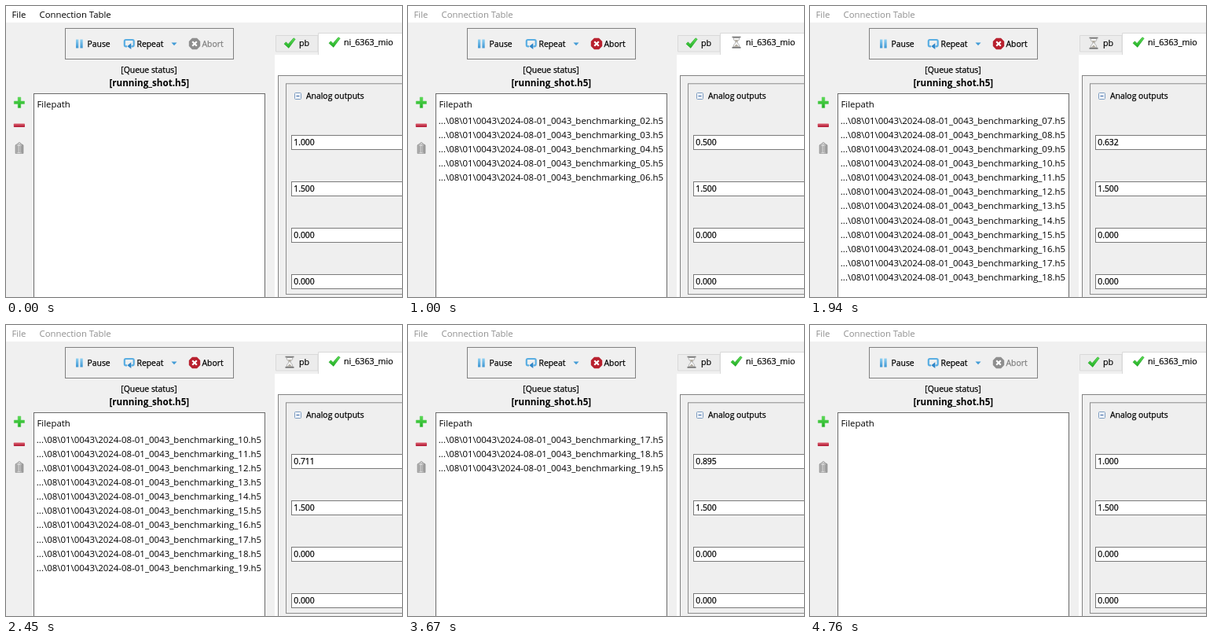
Write an HTML page that moves like this. It is 504 px wide and 370 px high and loops after 4.82 s.

```html
<!DOCTYPE html>
<html lang="en">
<head>
<meta charset="utf-8">
<title>Shot queue</title>
<style>
  html, body { margin: 0; width: 100%; height: 100%; overflow: hidden; background: #f0f0f0; }
  svg { display: block; width: 504px; height: 370px; }
  text { font-family: "Open Sans", "Noto Sans", sans-serif; fill: currentColor; color: #000; white-space: pre; }
  .ui { font-size: 11.35px; }
  .row { font-size: 11.46px; }
  .small { font-size: 10.4px; stroke: currentColor; stroke-width: .25px; }
  .tab { font-size: 10.75px; stroke: currentColor; stroke-width: .2px; }
  .head { font-size: 11.65px; font-weight: 700; }
</style>
</head>
<body>
<svg viewBox="0 0 504 370" xmlns="http://www.w3.org/2000/svg">
  <defs>
    <linearGradient id="blue" x1="0" y1="0" x2="0" y2="1">
      <stop offset="0" stop-color="#8fd0f2"/><stop offset="1" stop-color="#3d95d2"/>
    </linearGradient>
    <linearGradient id="green" x1="0" y1="0" x2="0" y2="1">
      <stop offset="0" stop-color="#5fdd58"/><stop offset="1" stop-color="#1fae22"/>
    </linearGradient>
    <linearGradient id="red" x1="0" y1="0" x2="0" y2="1">
      <stop offset="0" stop-color="#dc6272"/><stop offset="1" stop-color="#b01530"/>
    </linearGradient>
    <linearGradient id="metal" x1="0" y1="0" x2="1" y2="0">
      <stop offset="0" stop-color="#9a9a9a"/><stop offset=".45" stop-color="#dcdcdc"/><stop offset="1" stop-color="#8c8c8c"/>
    </linearGradient>
    <path id="check" d="M-7 1.2L-4.6-1.2L-1.9 1.6L5-6.2L7.2-4.8L-1.2 6.4Z" fill="url(#green)" stroke="#22a526" stroke-width=".6"/>
    <g id="glass">
      <path d="M-4-5.500C-4-2-1-1.500-1 0S-4 2.500-4 6H4C4 2.500 1 1.500 1 0S4-2 4-5.500Z" fill="#f6f6f6" stroke="#a8a8a8" stroke-width=".9"/>
      <path d="M-2.600-2.800H2.600L0 .3ZM-3 5.500L0 2.800L3 5.500Z" fill="#aaa497"/>
      <path d="M-5.500-6.500H5.500M-5.500 6.800H5.500" stroke="#787878" stroke-width="1.700"/>
    </g>
  </defs>

  <rect width="504" height="370" fill="#f0f0f0"/>
  <rect width="504" height="21" fill="#fff"/>
  <g id="menu">
    <text class="ui" x="7.500" y="15">File</text>
    <text class="ui" x="42.500" y="15">Connection Table</text>
  </g>

  <!-- toolbar -->
  <rect x="75.500" y="28.500" width="214" height="39" fill="none" stroke="#808080"/>
  <path d="M89 42.500h3.300v11H89ZM94.400 42.500h3.300v11h-3.300Z" fill="url(#blue)"/>
  <text class="small" x="103.500" y="52">Pause</text>
  <path d="M154 51.300H152.500Q150.800 51.300 150.800 49.500V44.800Q150.800 43 152.500 43H161Q162.700 43 162.700 44.800V49.500Q162.700 51.300 161 51.300H159.500" fill="none" stroke="#5aaee2" stroke-width="2.200"/>
  <path d="M159.300 47.200V55L154.300 51.200Z" fill="#2f86c8"/>
  <text class="small" x="166.500" y="52">Repeat</text>
  <path d="M210.500 46.500H217.500L214 50.300Z" fill="#419bd6"/>
  <path id="stop" d="M237 40.800H243L247.200 45V51L243 55.200H237L232.800 51V45Z"/>
  <path d="M237.200 45.200L242.800 50.800M242.800 45.200L237.200 50.800" stroke="#fff" stroke-width="2.200"/>
  <text id="abort" class="small" x="249.500" y="52">Abort</text>

  <text class="small" x="182" y="85" text-anchor="middle">[Queue status]</text>
  <text class="head" x="182.300" y="102" text-anchor="middle">[running_shot.h5]</text>

  <!-- side buttons -->
  <path d="M15.200 116h3.600v5H23.500v3.400h-4.700v5h-3.600v-5H10.300v-3.400h4.900Z" fill="url(#green)" stroke="#4cc84c" stroke-width=".5"/>
  <rect x="9.800" y="149.500" width="14.200" height="4.600" rx=".8" fill="url(#red)"/>
  <path d="M12 177Q12 175.500 17 175.500T22 177V187.500H12Z" fill="url(#metal)" stroke="#9a9a9a" stroke-width=".7"/>
  <path d="M14.500 175.500Q17 171.500 19.500 175.500M14.700 178V186M17 178V186M19.300 178V186" fill="none" stroke="#999"/>

  <rect x="35.500" y="111.500" width="294" height="270" fill="#fff" stroke="#6b6b6b"/>
  <text class="ui" x="39.500" y="129">Filepath</text>
  <g id="rows"></g>

  <!-- tabs -->
  <rect x="342" y="62" width="162" height="308" fill="#fff"/>
  <path d="M343.500 58V37.500H397V58Z" fill="#ececec" stroke="#d9d9d9"/>
  <path d="M397.500 63V34.500H504V63Z" fill="#fff"/>
  <path d="M397.500 62V34.500H504" fill="none" stroke="#d9d9d9"/>
  <use id="pb" x="361" y="47"/>
  <text class="tab" x="373" y="51">pb</text>
  <use id="mio" x="418" y="46"/>
  <text class="tab" x="430" y="50">ni_6363_mio</text>

  <!-- outputs -->
  <rect x="346.500" y="88.500" width="170" height="290" fill="#f0f0f0" stroke="#828282"/>
  <rect x="356.500" y="98.800" width="160" height="267.700" fill="#efefef" stroke="#8c8c8c"/>
  <rect x="367.500" y="110.500" width="8" height="8" rx="1" fill="#f5f8fc" stroke="#7d9cc0"/>
  <path d="M369.500 114.500H373.500" stroke="#2f5f9f"/>
  <text class="small" x="382" y="118">Analog outputs</text>
  <g id="fields"></g>
</svg>
<script>
  const LOOP = 4820, SHOTS = 20;
  const START = 600, SHOT = 175;               // run cadence
  const END = START + SHOT * (SHOTS + 1);
  const $ = id => document.getElementById(id);

  function add(parent, name, attrs) {
    const el = document.createElementNS("http://www.w3.org/2000/svg", name);
    for (const key in attrs) el.setAttribute(key, attrs[key]);
    return parent.appendChild(el);
  }

  function put(el, text) {
    if (el.textContent !== text) el.textContent = text;
  }

  const rows = Array.from({ length: 13 }, (_, i) =>
    add($("rows"), "text", { class: "row", x: 38.8, y: 150 + 18.08 * i }));

  const fields = ["1.000", "1.500", "0.000", "0.000"].map((value, i) => {
    const y = 164.5 + 59 * i;
    add($("fields"), "rect", { x: 363.5, y, width: 150, height: 18, fill: "#fff", stroke: "#7a7a7a" });
    const label = add($("fields"), "text", { class: "small", x: 366.2, y: y + 12.8 });
    label.textContent = value;
    return label;
  });

  const path = n => "...\\08\\01\\0043\\2024-08-01_0043_benchmarking_" +
    String(n).padStart(2, "0") + ".h5";

  // Number of shots added to the queue; the last one comes late.
  function added(t) {
    if (t >= 1975) return SHOTS;
    return Math.max(0, Math.min(SHOTS - 1, Math.floor((t - 552) / 69) + 1));
  }

  function setIcon(el, busy) {
    el.setAttribute("href", busy ? "#glass" : "#check");
  }

  function draw(t) {
    const active = t >= START && t < END;
    const step = Math.floor((t - START) / SHOT);
    const phase = (t - START) / SHOT - step;
    const first = t < START ? 0 : Math.max(1, Math.min(SHOTS, step));
    const last = added(t);

    rows.forEach((row, i) => put(row, first + i < last ? path(first + i) : ""));

    const done = Math.min(SHOTS - 1, step - 2);
    put(fields[0], (done < 0 ? 1 : 0.5 + 0.5 * done / (SHOTS - 1)).toFixed(3));

    const opening = step < 1;
    setIcon($("pb"), active && (opening || phase < 0.26 || phase > 0.5));
    setIcon($("mio"), active && !opening && phase < 0.48);

    $("menu").style.opacity = t < 120 ? 1 : 0.44;
    $("stop").style.fill = active ? "#b8202e" : "#8e8e8e";
    $("abort").style.color = active ? "#000" : "#808080";
  }

  const begin = performance.now();
  function tick() {
    draw((performance.now() - begin) % LOOP);
    requestAnimationFrame(tick);
  }
  tick();
</script>
</body>
</html>
```
